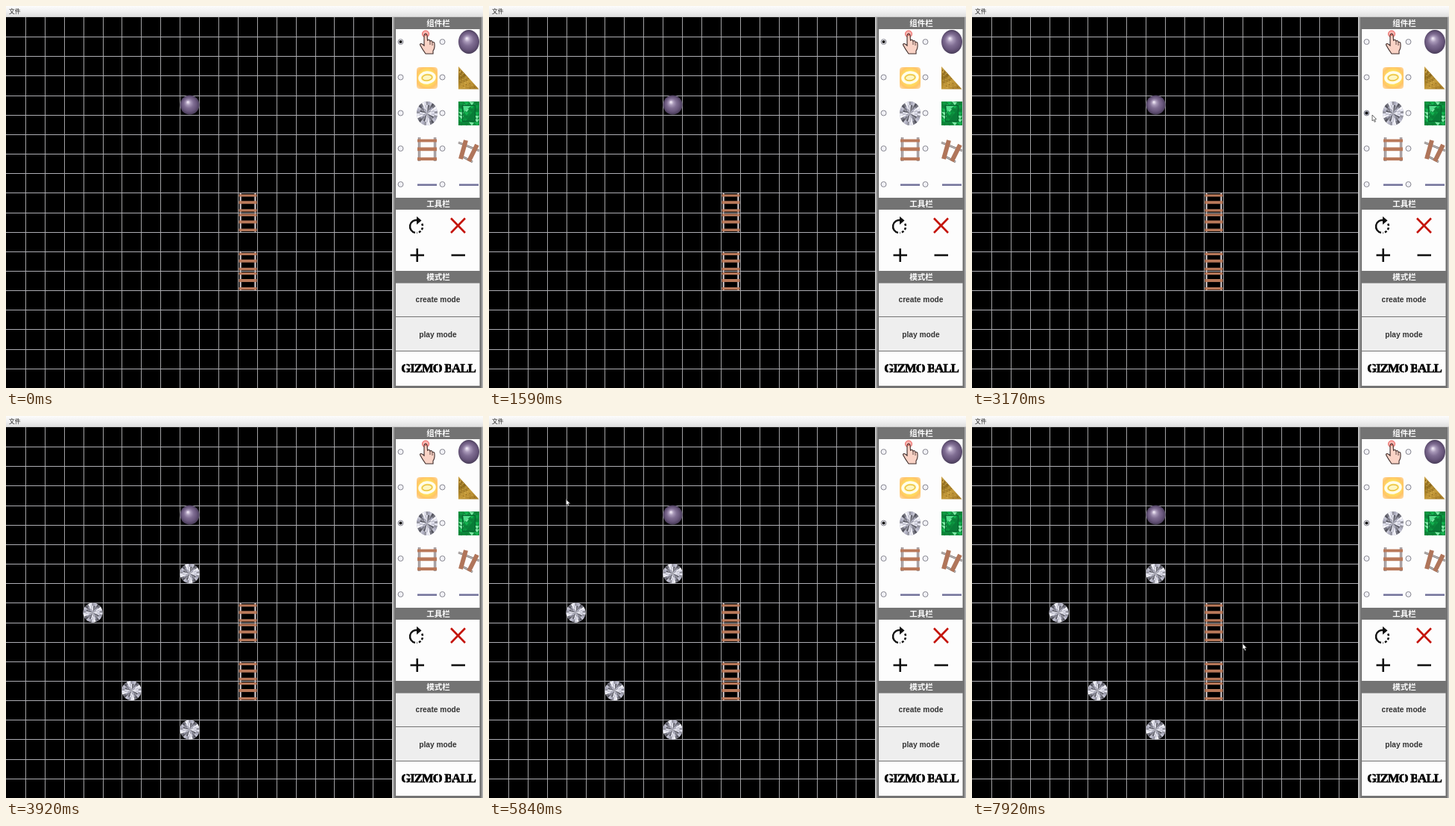
Animation of 640x512 px, one loop 8000 ms. Source, as an HTML page with a canvas:

```html
<!DOCTYPE html>
<html lang="zh">
<head>
<meta charset="utf-8">
<style>
html, body { margin: 0; width: 100%; height: 100%; overflow: hidden; background: #000; }
canvas { display: block; }
</style>
</head>
<body>
<canvas id="stage" width="640" height="512"></canvas>
<script>
const ctx = document.getElementById('stage').getContext('2d');
const LOOP = 8000, TAU = Math.PI * 2;
const FRAME = '#737373', BUTTON = '#eeeeee', PAPER = '#fdfdfd';
const CJK = '"Noto Sans CJK SC", "Noto Sans CJK", sans-serif';
const CELL_X = 25.91, CELL_Y = 26.15, TOP = 15;

// [time placed, x, y]
const DIAMONDS = [[3430, 246.5, 211], [3580, 116.5, 263.5], [3720, 168.5, 368], [3860, 246.5, 420.5]];
// [time, x, y] of the pointer tip
const PATH = [
  [1840, 330, 290], [2400, 537, 146], [3260, 537, 146], [3420, 248, 212], [3570, 118, 265],
  [3710, 170, 369], [3850, 248, 421], [4170, 248, 421], [4640, 12, 8], [4760, 14, 22],
  [5000, 23, 39], [5500, 23, 39], [6200, 190, 190], [6750, 261, 243], [7500, 340, 295],
  [7900, 363, 305], [8000, 363, 305]
];

function rect(x, y, w, h, color) {
  ctx.fillStyle = color;
  ctx.fillRect(x, y, w, h);
}

function shape(points, fill, stroke, width = 1) {
  ctx.beginPath();
  points.forEach(([x, y]) => ctx.lineTo(x, y));
  ctx.closePath();
  if (fill) { ctx.fillStyle = fill; ctx.fill(); }
  if (stroke) { ctx.strokeStyle = stroke; ctx.lineWidth = width; ctx.stroke(); }
}

function line(x1, y1, x2, y2, color, width = 1) {
  ctx.strokeStyle = color;
  ctx.lineWidth = width;
  ctx.beginPath();
  ctx.moveTo(x1, y1);
  ctx.lineTo(x2, y2);
  ctx.stroke();
}

function oval(x, y, rx, ry, fill, stroke, width = 1) {
  ctx.beginPath();
  ctx.ellipse(x, y, rx, ry, 0, 0, TAU);
  if (fill) { ctx.fillStyle = fill; ctx.fill(); }
  if (stroke) { ctx.strokeStyle = stroke; ctx.lineWidth = width; ctx.stroke(); }
}

function text(str, x, y, font, color, align = 'left') {
  ctx.font = font;
  ctx.fillStyle = color;
  ctx.textAlign = align;
  ctx.fillText(str, x, y);
}

function gradient(g, ...colors) {
  colors.forEach((c, i) => g.addColorStop(i / (colors.length - 1), c));
  return g;
}

function ball(x, y, rx, ry = rx) {
  const g = ctx.createRadialGradient(x - rx * .2, y - ry * .3, 0, x, y, ry);
  oval(x, y, rx, ry, gradient(g, '#fbf4ff', '#a999b9', '#7f6d92', '#69577c', '#483c58'));
}

function diamond(x, y, rx, ry = rx) {
  const tones = ['#e6e6f2', '#74747f', '#c4c4d2', '#94949f', '#f7f7fc', '#55555f', '#adadc0'];
  const n = 30;
  const at = (i, k) => [x + Math.cos(i / n * TAU) * rx * k, y + Math.sin(i / n * TAU) * ry * k];
  oval(x, y, rx, ry, '#a0a0ac');
  for (let i = 0; i < n; i++) {
    shape([at(i, .7), at(i, 1), at(i + 1, 1), at(i + 1, .7)], tones[i * 3 % 7]);
    shape([at(i, .35), at(i, .7), at(i + 1, .7), at(i + 1, .35)], tones[(i * 5 + 2) % 7]);
    shape([[x, y], at(i, .4), at(i + 1, .4)], tones[i * 4 % 7]);
  }
}

function ladder(x, y, w, h) {
  for (const rail of [x + w * .12, x + w * .88]) {
    rect(rail - 1.5, y, 3, h, '#6f6768');
    rect(rail - .6, y, 1.2, h, '#d9d2d4');
  }
  for (const [a, b] of [[.08, .2], [.42, .57], [.84, .97]])
    rect(x + 1, y + h * a, w - 2, h * (b - a), '#b9795a');
}

function curvedTrack() {
  const rails = [[607, 183, 635, 194], [609, 200, 626, 209]];
  for (const r of rails) {
    line(...r, '#77706f', 2.6);
    line(...r, '#d6d0d0', 1);
  }
  line(610, 205, 617, 180, '#b0755a', 6);
  line(621, 208, 632, 186, '#b0755a', 6);
}

function hand() {
  oval(563, 37.5, 4.5, 4.5, '#ffb5b0', '#e45b58');
  ctx.beginPath();
  ctx.moveTo(561, 52);
  ctx.lineTo(561, 39);
  ctx.quadraticCurveTo(563, 35, 565, 39);
  ctx.lineTo(565.5, 46);
  ctx.quadraticCurveTo(568, 44, 569, 47);
  ctx.quadraticCurveTo(571.5, 45.5, 572, 48.5);
  ctx.quadraticCurveTo(575, 47.5, 575, 51);
  ctx.quadraticCurveTo(575.5, 57, 573, 60);
  ctx.lineTo(573, 64);
  ctx.lineTo(563, 64);
  ctx.quadraticCurveTo(558, 57, 555.5, 52);
  ctx.quadraticCurveTo(556, 48.5, 561, 53);
  ctx.closePath();
  ctx.fillStyle = '#fad3c6';
  ctx.fill();
  ctx.strokeStyle = '#3c2a28';
  ctx.lineWidth = 1.1;
  ctx.stroke();
  line(569, 47, 569, 52, '#3c2a28', .8);
  line(572, 49, 572, 53, '#3c2a28', .8);
  line(563, 38, 563, 40, '#df4a40', 1.5);
}

function glowRing() {
  const g = ctx.createRadialGradient(565, 96, 3, 565, 96, 20);
  ctx.fillStyle = gradient(g, '#fff8b0', '#ffe25a', '#ffc468', '#ffddb0');
  ctx.beginPath();
  ctx.roundRect(551, 82, 28, 29, 4);
  ctx.fill();
  ctx.save();
  ctx.translate(565, 96);
  ctx.rotate(-.12);
  oval(0, 0, 10, 7, '#ffe978', '#fffdec', 3.5);
  oval(0, 0, 6.5, 3.8, '#fff6c0', '#e0b534', 1);
  ctx.restore();
}

function goldTriangle() {
  const g = ctx.createLinearGradient(607, 82, 628, 111);
  shape([[607, 81], [607, 111.5], [634.5, 111.5]], gradient(g, '#cfa244', '#94701f', '#c59a3a', '#a77d28'));
  for (let i = 0; i < 40; i++) {
    const v = (i * .618 + .1) % 1, u = i * .414 % 1;
    rect(608 + u * v * 23, 83 + v * 27, 1, 1, i % 2 ? '#dfbd60' : '#755518');
  }
}

function emerald() {
  const greens = ['#0c9a42', '#39d477', '#067030', '#13b450', '#04552a', '#7fe8a6', '#0a8038'];
  rect(607, 128, 28, 32, '#0c8a3c');
  for (let i = 0; i < 28; i++) {
    const x = 607 + i % 4 * 7, y = 128 + Math.floor(i / 4) * 4.6, c = greens[i * i * 3 % 7];
    shape([[x, y], [x + 7, y + 1], [x + 4, y + 5]], c);
  }
  shape([[613, 133], [625, 133], [615, 142]], '#55dc8c');
  shape([[629, 138], [629, 154], [617, 154]], '#087c37');
  ctx.strokeStyle = '#07602d';
  ctx.lineWidth = 1;
  ctx.strokeRect(612.5, 133.5, 17, 21);
}

function radio(x, y, on, hover) {
  oval(x, y, 3.5, 3.5, hover ? '#b4b8c8' : '#f1f1f6', '#85858f');
  if (on) oval(x, y, 2.1, 2.1, '#111');
}

function rotateIcon() {
  ctx.strokeStyle = '#111';
  ctx.lineWidth = 2.5;
  ctx.beginPath();
  ctx.arc(550.5, 295.5, 8.5, 1.75, 4.9);
  ctx.stroke();
  ctx.setLineDash([3, 2.3]);
  ctx.beginPath();
  ctx.arc(550.5, 295.5, 8.5, -.45, 1.5);
  ctx.stroke();
  ctx.setLineDash([]);
  shape([[551, 282], [557.5, 287.5], [551, 293]], '#111');
}

function board(t) {
  rect(0, TOP, 519, 497, '#000');
  for (let i = 1; i < 20; i++) rect(Math.round(i * CELL_X), TOP, 1, 497, '#a2a2a4');
  for (let i = 1; i < 19; i++) rect(0, Math.round(TOP + i * CELL_Y), 519, 1, '#aeaeb4');
  ball(246.5, 132.5, 13);
  for (const y of [250.3, 276.5, 328.8, 355]) ladder(311.5, y, 26, 26.2);
  for (const [time, x, y] of DIAMONDS) if (t >= time) diamond(x, y, 13);
}

function sidebar(t) {
  rect(518, TOP, 122, 497, FRAME);
  rect(518, TOP, 1, 497, '#dedede');
  rect(519, TOP, 2, 497, '#a2a2a2');
  rect(638, TOP, 2, 497, '#aaaaaa');
  [['组件栏', 26.5], ['工具栏', 268.5], ['模式栏', 367]].forEach(([s, y]) =>
    text(s, 580, y, 'bold 10.5px ' + CJK, '#fff', 'center'));
  rect(523, 31, 112.5, 226, PAPER);
  rect(523, 273, 112.5, 82, PAPER);
  rect(523, 371.5, 112.5, 44.5, BUTTON);
  rect(523, 417, 112.5, 45, BUTTON);
  rect(523, 463, 112.5, 46, PAPER);

  ctx.save();
  ctx.beginPath();
  ctx.rect(523, 31, 112.5, 226);
  ctx.clip();
  hand();
  ball(621, 48, 14, 16);
  glowRing();
  goldTriangle();
  diamond(565, 144, 14, 16);
  emerald();
  ladder(551, 176, 28, 32);
  curvedTrack();
  for (const x of [552, 608]) {
    rect(x, 238, 26, 1, '#b2b2cc');
    rect(x, 239, 26, 2, '#74749a');
  }
  ctx.restore();

  const picked = t < 2750 ? 0 : 2;
  [48, 95.5, 143.5, 191, 239].forEach((y, i) => {
    radio(529.5, y, i === picked, i === 2 && t > 2400 && t < 3300);
    radio(585.5, y);
  });

  rotateIcon();
  line(597, 284.5, 616, 304, '#c4140c', 2.6);
  line(616, 284.5, 597, 304, '#c4140c', 2.6);
  line(542.5, 334, 561, 334, '#111', 2.6);
  line(551.7, 325, 551.7, 343, '#111', 2.6);
  line(597.5, 334, 616, 334, '#111', 2.6);

  const label = 'bold 10.2px "Liberation Sans", Arial, sans-serif';
  text('create mode', 579.5, 397, label, '#333', 'center');
  text('play mode', 579.5, 443.5, label, '#333', 'center');
  title();
}

function title() {
  ctx.letterSpacing = '-0.8px';
  text('GIZMO BALL', 580, 491, 'bold 16.5px "Liberation Serif", Tinos, serif', '#000', 'center');
  ctx.strokeStyle = '#000';
  ctx.lineWidth = .7;
  ctx.strokeText('GIZMO BALL', 580, 491);
  ctx.letterSpacing = '0px';
  // stencil cuts
  for (const x of [536, 580, 597]) rect(x, 478, 1, 14, PAPER);
}

function menu(t) {
  const bar = ctx.createLinearGradient(0, 0, 0, TOP);
  rect(0, 0, 640, TOP, gradient(bar, '#fcfcfc', '#f0f0f0', '#dedede'));
  rect(0, 14, 640, 1, '#cccccc');
  const open = t >= 4670 && t < 5500;
  if (open) {
    rect(0, 0, 23, 13, '#a9adb2');
    rect(0, 13, 30, 59, '#8a8a8a');
    rect(1, 14, 28, 57, '#f0f0f0');
    const hover = t < 4760 ? -1 : t < 4920 ? 0 : 1;
    if (hover >= 0) rect(1, 15 + hover * 14, 28, 14, '#a9adb2');
    ['打开', '保存', '清空', '退出'].forEach((s, i) =>
      text(s, 5, 25 + i * 13.8, '7.7px ' + CJK, '#222'));
  }
  text('文件', 4, 9.7, '7.8px ' + CJK, '#222');
}

function pointer(t) {
  if (t < PATH[0][0] || (t >= 3850 && t < 4170)) return;
  const i = Math.max(1, PATH.findIndex(p => p[0] > t));
  const [t0, x0, y0] = PATH[i - 1], [t1, x1, y1] = PATH[i];
  const u = (t - t0) / (t1 - t0), k = u * u * (3 - 2 * u);
  const x = x0 + (x1 - x0) * k, y = y0 + (y1 - y0) * k;
  const outline = [[0, 0], [0, 8], [1.8, 6.5], [3.2, 9.5], [4.5, 8.8], [3.2, 6], [5.5, 5.7]];
  shape(outline.map(([a, b]) => [x + a, y + b]), '#fff', '#444', .8);
}

function draw(now) {
  const t = now % LOOP;
  board(t);
  sidebar(t);
  menu(t);
  pointer(t);
  requestAnimationFrame(draw);
}
requestAnimationFrame(draw);
</script>
</body>
</html>
```
